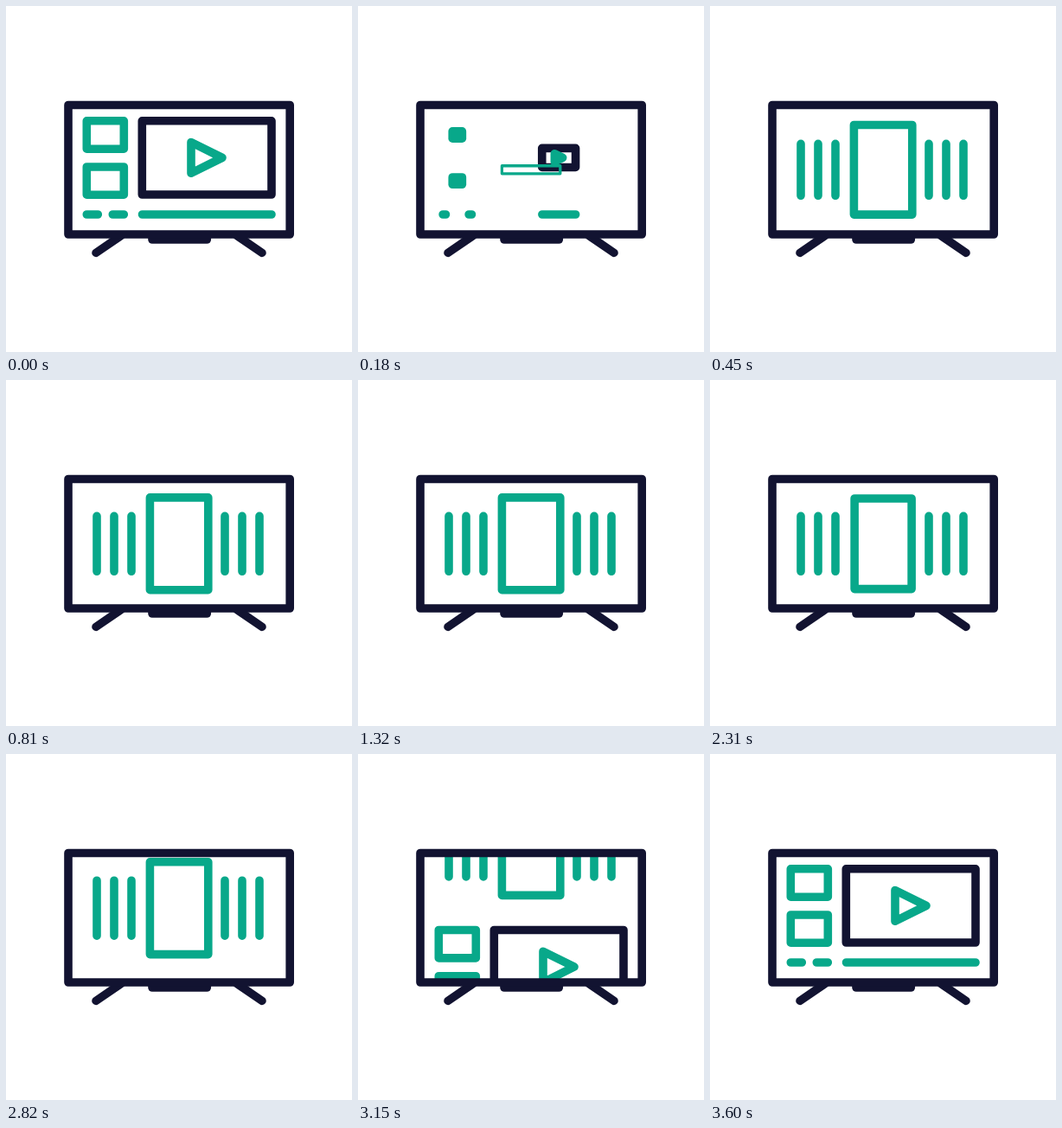
An HTML page with a canvas that plays this animation: 400x400 px, repeating every 5630 ms.

```html
<!DOCTYPE html>
<html lang="en">
<head>
<meta charset="utf-8">
<title>Television</title>
<style>
  html, body { margin: 0; width: 100%; height: 100%; overflow: hidden; background: #fff; }
  canvas { display: block; width: 100%; height: 100%; }
</style>
</head>
<body>
<canvas id="stage" width="400" height="400"></canvas>
<script>
const LOOP = 5630, FRAME = 30, STROKE = 9.6;
const DARK = '#121331', GREEN = '#08a88a';
const ctx = document.getElementById('stage').getContext('2d');
ctx.lineCap = ctx.lineJoin = 'round';

const clamp = v => Math.max(0, Math.min(1, v));
const mix = (a, b, p) => a + (b - a) * p;
const smooth = p => p * p * (3 - 2 * p);
const easeOut = p => 1 - (1 - p) ** 2;
const span = (t, start, end, ease = smooth) => ease(clamp((t - start) / (end - start)));

// Strokes a closed outline scaled about its middle; the line thins only near zero.
function outline(points, color, scaleX = 1, scaleY = scaleX) {
  const size = Math.min(scaleX, scaleY);
  if (size <= 0) return;
  const middle = axis => {
    const values = points.map(p => p[axis]);
    return (Math.min(...values) + Math.max(...values)) / 2;
  };
  const cx = middle(0), cy = middle(1);
  ctx.beginPath();
  for (const [x, y] of points) ctx.lineTo(cx + (x - cx) * scaleX, cy + (y - cy) * scaleY);
  ctx.closePath();
  ctx.strokeStyle = color;
  ctx.lineWidth = STROKE * Math.min(1, size * 4);
  ctx.stroke();
}

const box = (x0, y0, x1, y1) => [[x0, y0], [x1, y0], [x1, y1], [x0, y1]];
const line = (x0, y0, x1, y1) => [[x0, y0], [x1, y1]];

const playerParts = [
  [box(93.3, 132.8, 136.3, 165.2), GREEN],
  [box(93.3, 186, 136.3, 218.2), GREEN],
  [line(93.3, 241, 106.3, 241), GREEN],
  [line(123.3, 241, 136.3, 241), GREEN],
  [line(157.5, 241, 307, 241), GREEN],
  [box(157.3, 132.8, 307, 218), DARK],
  [[[214, 157.5], [250, 175.4], [214, 193.3]], GREEN]
];

function drawPlayer(scale) {
  for (const [points, color] of playerParts) outline(points, color, scale);
}

// Resting shape of a carousel card; slot 0 is the open one.
function slot(k) {
  if (k === 0) return { left: 166.4, right: 233.8, half: 53.4, size: 1 };
  const distance = Math.min(3, Math.abs(k));
  const x = k < 0 ? 165 - 20 * distance : 233 + 20 * distance;
  const visible = Math.abs(k) < 4 ? 1 : 0;
  return { left: x, right: x, half: 32 * visible, size: visible };
}

function drawCarousel(shift, grow, growOpen, press) {
  for (let k = -3; k <= 4; k++) {
    const from = slot(k), to = slot(k - 1);
    const at = key => mix(from[key], to[key], shift);
    const size = at('size'), half = at('half');
    if (size <= 0) continue;
    const open = k === 0;
    const scaleX = open ? press : 1;
    const scaleY = open ? growOpen * press : grow;
    const points = box(at('left'), 189.3 - half, at('right'), 189.3 + half);
    if (size < 1) {
      ctx.save();
      ctx.globalAlpha = size;
      outline(points, GREEN, scaleX, scaleY);
      ctx.restore();
    } else {
      outline(points, GREEN, scaleX, scaleY);
    }
  }
}

function drawTelevision() {
  outline(line(133, 265.5, 104, 285.4), DARK);
  outline(line(267, 265.5, 296, 285.4), DARK);
  outline(box(169, 265, 232.3, 270), DARK);
  outline(box(72, 114.5, 328.2, 264), DARK);
}

function draw(t) {
  ctx.fillStyle = '#fff';
  ctx.fillRect(0, 0, 400, 400);

  ctx.save();
  ctx.beginPath();
  ctx.rect(72, 114.5, 256, 149.5);
  ctx.clip();

  if (t < 270) drawPlayer(1 - span(t, 0, 270));

  const scroll = 150 * span(t, 2664, 3600);
  if (t < 3600) {
    const start = [1560, 1050, 540].find(s => t >= s);
    const shift = start ? span(t, start, start + 270) % 1 : 0;
    const press = 1 - 0.2 * (span(t, 2280, 2430) - span(t, 2430, 2640));
    ctx.save();
    ctx.translate(0, -scroll);
    drawCarousel(shift, span(t, 180, 540, easeOut), span(t, 165, 510, easeOut), press);
    ctx.restore();
  }
  if (scroll > 0) {
    ctx.save();
    ctx.translate(0, 150 - scroll);
    drawPlayer(1);
    ctx.restore();
  }
  ctx.restore();

  drawTelevision();
}

const began = performance.now();
function tick() {
  const t = (performance.now() - began) % LOOP;
  draw(Math.floor(t / FRAME) * FRAME);
  requestAnimationFrame(tick);
}
tick();
</script>
</body>
</html>
```
